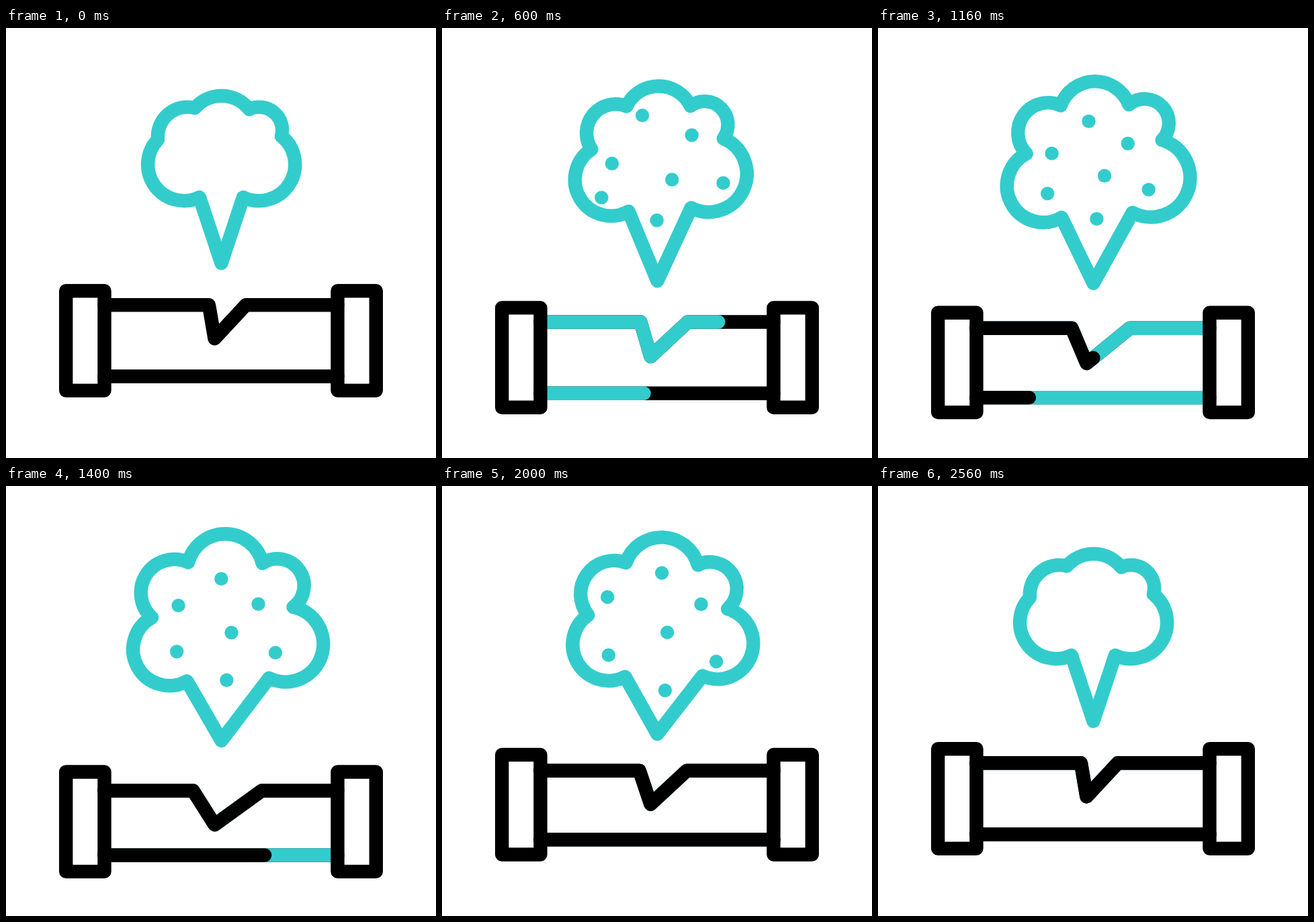
These frames come from a looping animation (640x640 px, 2.6 s). An HTML page with a canvas:

```html
<!DOCTYPE html>
<html lang="en">
<head>
<meta charset="utf-8">
<title>Leaking pipe</title>
<style>
  html, body { margin: 0; height: 100%; overflow: hidden; background: #fff; }
  canvas { display: block; width: 100vmin; height: 100vmin; }
</style>
</head>
<body>
<canvas id="stage" width="640" height="640"></canvas>
<script>
const ctx = document.getElementById('stage').getContext('2d');
const LOOP = 2600, TEAL = '#33cccc', BLACK = '#000';

// Junctions between the cloud lobes: x, y, bulge of the lobe that ends there.
const restCloud = [[288, 252, 0], [226, 166, .83], [281, 119, .52], [362, 121, .47], [410, 161, .64], [353, 252, .89]];
const puffCloud = [[273.5, 281.5, 0], [221, 186.5, 1.02], [272, 115.5, .83], [373, 114, .69], [422.5, 166, .95], [378, 274, 1.1]];
const fullCloud = [[265.5, 298.5, 0], [213.5, 204, .98], [270.5, 112, .88], [389.5, 116, .86], [432, 193, 1], [403.5, 296.5, 1.16]];

// Where each droplet starts, and how far it drifts.
const drops = [
  { x: 297.5, y: 130, dx: 29.5, dy: 4.5 },
  { x: 371.5, y: 159, dx: 10, dy: 19 },
  { x: 253, y: 202.5, dx: -1.5, dy: -34.5 },
  { x: 342.5, y: 226, dx: -8, dy: -9 },
  { x: 419, y: 230, dx: -16.5, dy: 27.5 },
  { x: 237, y: 252.5, dx: 16, dy: -4 },
  { x: 319.5, y: 286, dx: 12, dy: 11.5 }
];

function ease(t, from, to) {
  const u = Math.min(1, Math.max(0, (t - from) / (to - from)));
  return u * u * (3 - 2 * u);
}
const mix = (a, b, k) => a + (b - a) * k;
const morph = (a, b, k) => a.map((row, i) => row.map((v, j) => mix(v, b[i][j], k)));

function drawCloud(t) {
  const swell = ease(t, 1100, 1680), back = ease(t, 1770, 2390);
  const grown = morph(morph(restCloud, puffCloud, ease(t, 240, 800)), fullCloud, swell);
  const [first, ...others] = morph(grown, restCloud, back);
  const tip = 350 + (30 * ease(t, 240, 700) - 2 * swell) * (1 - back);
  let [px, py] = first;
  let d = `M320.5 ${tip}L${px} ${py}`;
  for (const [x, y, bulge] of others) {
    const r = Math.hypot(x - px, y - py) * (1 + bulge * bulge) / (4 * bulge);
    d += `A${r} ${r} 0 ${bulge > 1 ? 1 : 0} 1 ${x} ${y}`;
    [px, py] = [x, y];
  }
  ctx.strokeStyle = TEAL;
  ctx.stroke(new Path2D(d + 'Z'));
}

// Droplets drift on their own while the whole group breathes in and out.
function drawDrops(t) {
  const drift = ease(t, 480, 1820);
  const breath = 1 - .09 * Math.sin(Math.PI * (t - 600) / 1080);
  const size = 10.2 * ease(t, 400, 580) * (1 - ease(t, 2020, 2220));
  const cx = 324, cy = 205;
  ctx.fillStyle = TEAL;
  for (const { x, y, dx, dy } of drops) {
    ctx.beginPath();
    ctx.arc(cx + (x + dx * drift - cx) * breath, cy + (y + dy * drift - cy) * breath, size, 0, 7);
    ctx.fill();
  }
}

function strokePart(points, part, color) {
  if (part <= 0) return;
  let length = 0;
  ctx.beginPath();
  points.forEach(([x, y], i) => {
    if (i) length += Math.hypot(x - points[i - 1][0], y - points[i - 1][1]);
    ctx.lineTo(x, y);
  });
  ctx.setLineDash(part < 1 ? [length * part, 2000] : []);
  ctx.strokeStyle = color;
  ctx.stroke();
  ctx.setLineDash([]);
}

function drawFlow(points, fill, drain) {
  strokePart(points, 1, BLACK);
  strokePart(points, fill, TEAL);
  strokePart(points, drain, BLACK);
}

function drawPipe(t) {
  const left = 146.5, right = 493.5, width = 57.3, height = 148.4, inset = 21.1;
  const stay = 1 - ease(t, 1680, 2155);
  const sink = stay * (32.4 * ease(t, 285, 740) + 3.5 * ease(t, 1100, 1680));
  const squeeze = stay * ease(t, 960, 1680);
  const crack = stay * ease(t, 300, 900);
  const widen = stay * ease(t, 1100, 1680);

  const collar = 391.2 + sink;
  const top = collar + inset + 10.4 * squeeze;
  const bottom = collar + height - inset - 4.8 * squeeze;
  const upper = [
    [left, top],
    [302 - 13 * crack - 20 * widen, top],
    [310.5, top + 50 + 3 * crack - 3.5 * squeeze],
    [357 + 17.5 * crack + 11.5 * widen, top],
    [right, top]
  ];
  drawFlow(upper, ease(t, 168, 777), ease(t, 847, 1452));
  drawFlow([[left, bottom], [right, bottom]], ease(t, 240, 1020), ease(t, 930, 1680));
  ctx.strokeStyle = BLACK;
  for (const x of [left - width, right]) ctx.strokeRect(x, collar, width, height);
}

function frame(now) {
  const t = now % LOOP;
  ctx.fillStyle = '#fff';
  ctx.fillRect(0, 0, 640, 640);
  ctx.lineWidth = 20.4;
  ctx.lineCap = ctx.lineJoin = 'round';
  drawCloud(t);
  drawDrops(t);
  drawPipe(t);
  requestAnimationFrame(frame);
}
requestAnimationFrame(frame);
</script>
</body>
</html>
```
